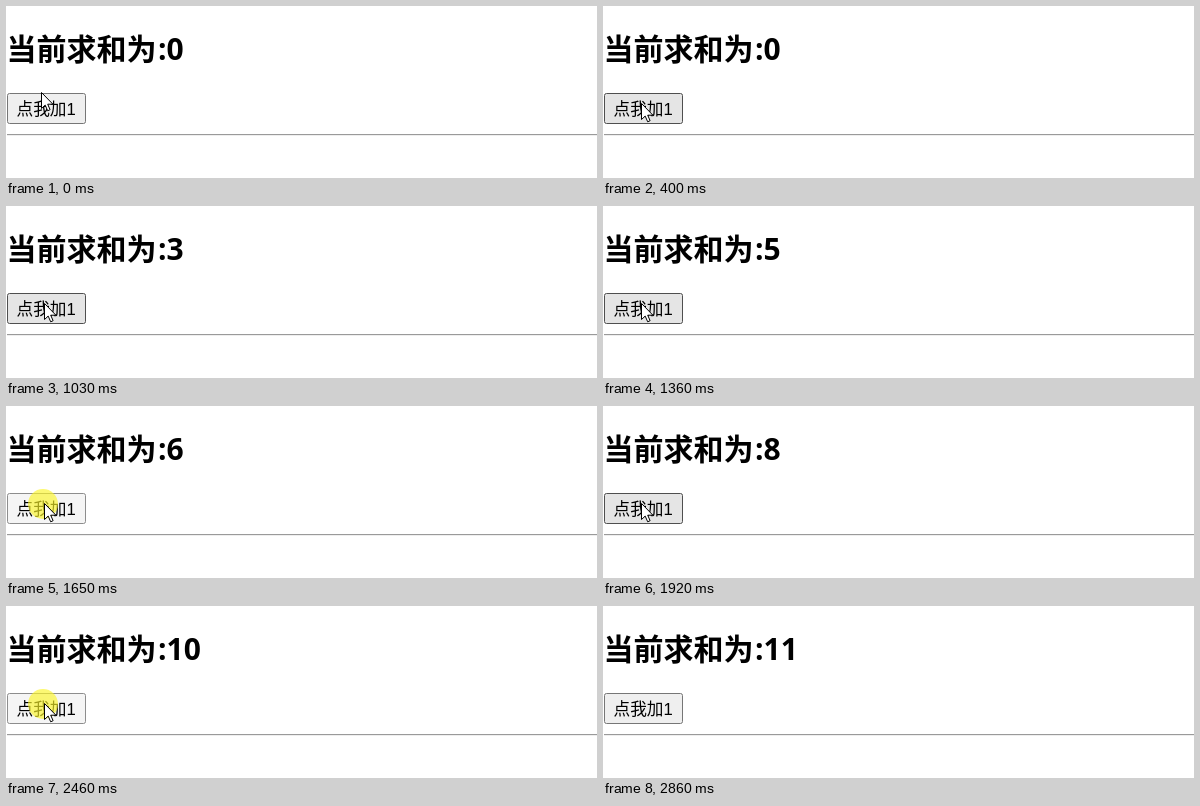
These frames come from a looping animation (591 by 172 pixels, 3260 ms). An HTML page with a canvas:

```html
<!DOCTYPE html>
<html lang="zh-CN">
<head>
<meta charset="utf-8">
<title>求和</title>
<style>
html, body { margin: 0; width: 100%; height: 100%; overflow: hidden; background: #fff; }
canvas { display: block; }
</style>
</head>
<body>
<canvas id="stage" width="591" height="172"></canvas>
<script>
const ctx = document.getElementById('stage').getContext('2d');
const LOOP = 3260, STEP = 70;
const CLICKS = 11, FIRST = 548, PERIOD = 196, HOLD = 100;
const ARRIVE = 70, LEAVE = 2730, GONE = 2860;
const CJK = '"Noto Sans CJK SC", "Noto Sans CJK", sans-serif';

const skins = {
  normal: ['#efefef', '#767676'],
  hover: ['#e5e5e5', '#4f4f4f'],
  active: ['#f5f5f5', '#8d8d8d']
};

// The count rises on release; each press lasts HOLD before it
function clickState(t) {
  const phase = (t - FIRST) / PERIOD + 1;
  const count = Math.min(CLICKS, Math.max(0, Math.floor(phase)));
  const wait = FIRST + count * PERIOD - t;
  return { count, pressed: count < CLICKS && wait <= HOLD };
}

// Glides onto the button, rests, then drops off the stage
function pointerAt(t) {
  if (t >= GONE) return null;
  if (t >= LEAVE) {
    const k = Math.floor((t - LEAVE) / STEP) + 1;
    return { x: 38 - k, y: 97 + 26 * k };
  }
  const k = Math.max(0, Math.floor((t - ARRIVE) / STEP) + 1);
  const p = Math.min(1, k / 4);
  const ease = p * p * (3 - 2 * p);
  return { x: 35 + Math.round(3 * ease), y: 86 + Math.round(11 * ease) };
}

function text(str, x, y, font) {
  ctx.font = font;
  ctx.fillStyle = '#000';
  ctx.fillText(str, x, y);
}

function drawButton(skin) {
  const [fill, border] = skins[skin];
  ctx.beginPath();
  ctx.roundRect(1.5, 87.5, 78, 30, 2);
  ctx.fillStyle = fill;
  ctx.fill();
  ctx.strokeStyle = border;
  ctx.lineWidth = 1;
  ctx.stroke();
  text('点我加', 10.5, 109, '300 16.67px ' + CJK);
  text('1', 60.5, 109, '16.67px "Liberation Sans", Arial, sans-serif');
}

function drawHighlight() {
  ctx.fillStyle = 'rgba(250, 245, 40, 0.65)';
  ctx.beginPath();
  ctx.arc(37, 98, 15, 0, Math.PI * 2);
  ctx.fill();
}

function drawPointer({ x, y }) {
  ctx.save();
  ctx.translate(x + 0.5, y + 0.5);
  ctx.beginPath();
  [[0, 0], [0, 16], [3.7, 12.6], [6.2, 18.3], [8.6, 17.2], [6.2, 11.7], [11.4, 11.7]]
    .forEach(p => ctx.lineTo(...p));
  ctx.closePath();
  ctx.fillStyle = '#fff';
  ctx.fill();
  ctx.strokeStyle = '#000';
  ctx.lineWidth = 1;
  ctx.stroke();
  ctx.restore();
}

function draw(t) {
  const { count, pressed } = clickState(t);
  const pointer = pointerAt(t);
  const over = pointer && pointer.y >= 87 && pointer.y < 118;

  ctx.fillStyle = '#fff';
  ctx.fillRect(0, 0, 591, 172);
  text('当前求和为', 0.5, 54, 'bold 30px ' + CJK);
  text(':' + count, 152, 54, 'bold 30px "Open Sans", "Noto Sans", sans-serif');
  ctx.fillStyle = '#9a9a9a';
  ctx.fillRect(1, 128, 590, 1);
  ctx.fillStyle = '#eee';
  ctx.fillRect(1, 129, 590, 1);

  drawButton(pressed ? 'active' : over ? 'hover' : 'normal');
  if (pressed) drawHighlight();
  if (pointer) drawPointer(pointer);
}

function tick() {
  draw(performance.now() % LOOP);
  requestAnimationFrame(tick);
}
tick();
</script>
</body>
</html>
```
